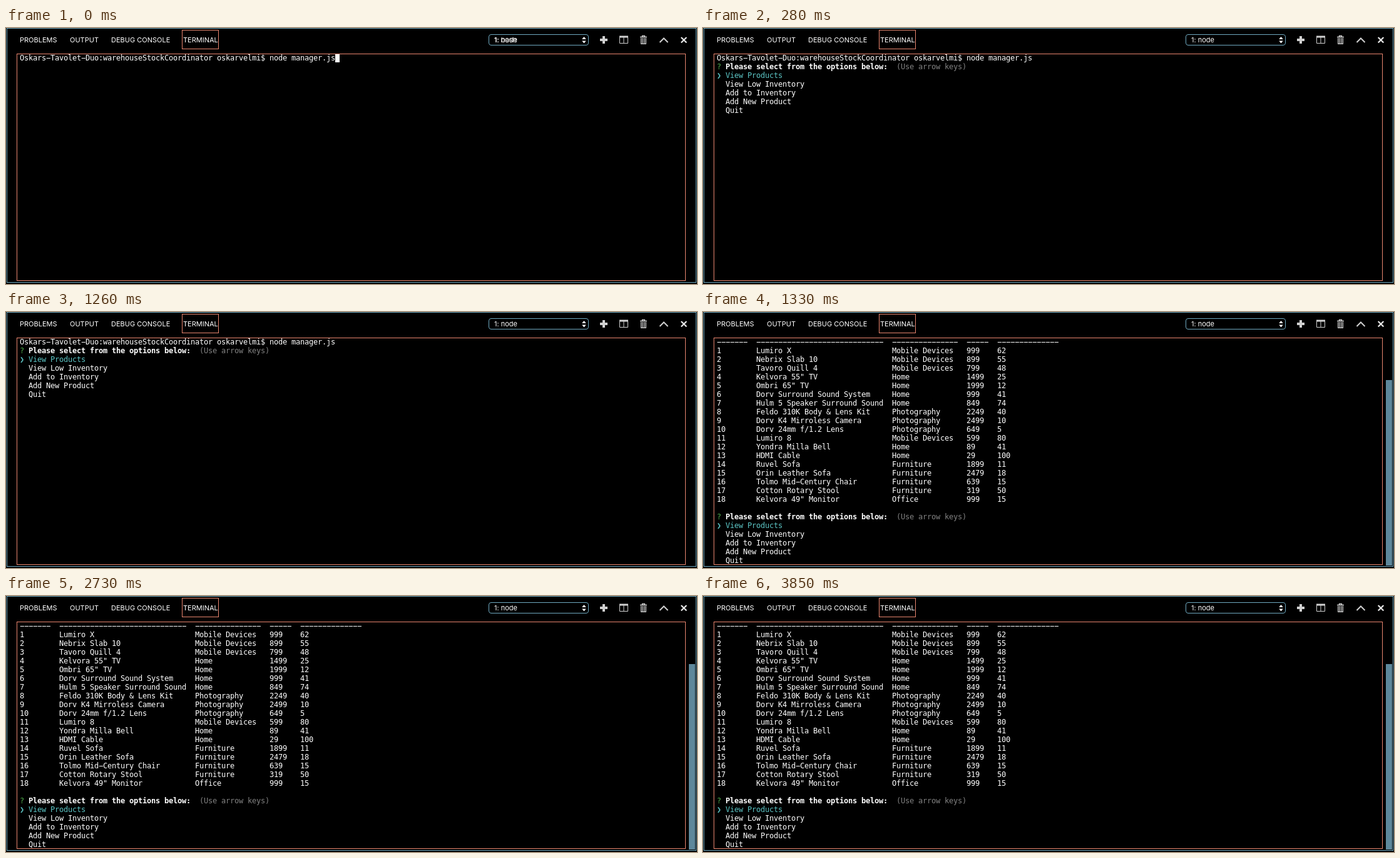
Animation of 1104 by 410 pixels, one loop 3.92 s. Source, as an HTML page:

```html
<!DOCTYPE html>
<html lang="en">
<head>
<meta charset="utf-8">
<title>Terminal</title>
<style>
  :root { --line: #6fa9c0; --focus: #ea866f; --loop: 3920ms step-end infinite; }
  html, body { margin: 0; width: 100%; height: 100%; overflow: hidden; background: #000; }
  .stage { position: relative; width: 1104px; height: 410px; overflow: hidden; background: #000; color: #fff; }
  .stage > *, .arrow { position: absolute; }

  .panel { left: 1px; top: 0; width: 1100px; height: 406px; border: 1px solid var(--line); }
  .focus { border: 1px solid var(--focus); }
  .view { left: 17px; top: 41px; width: 1067px; height: 362px; }
  .tab-box { left: 281px; top: 3px; width: 57px; height: 29px; }

  .ui { top: 8px; font: 11px/22px Inter, "Liberation Sans", sans-serif; white-space: pre; }
  .select { left: 771px; top: 10px; width: 158px; height: 16px; border: 1px solid var(--line); border-radius: 4px; }
  .icons { left: 0; top: 0; }

  pre {
    left: 22px; top: 41px; margin: 0;
    font: 12px/14px "DejaVu Sans Mono", "Liberation Mono", monospace;
    letter-spacing: calc(7px - 1ch);
  }
  pre b { font-weight: 700; }
  .ok { color: #4fae4b; }
  .pick { color: #5cc6c6; }
  .hint { color: #828282; }
  .arrow { left: 0; }
  .caret { width: 7px; height: 14px; background: #fff; }
  .scroll { left: 1091px; top: 109px; width: 10px; height: 297px; background: #5e889b; }

  /* typed command 0, running 70, menu 280, listing 1330 (ms) */
  .typed { animation: typed var(--loop); }
  .running { animation: running var(--loop); }
  .waiting { animation: waiting var(--loop); }
  .command { animation: command var(--loop); }
  .listing { animation: listing var(--loop); }
  .menu { top: 55px; animation: menu var(--loop); }

  @keyframes typed { 0% { visibility: visible } 1.7857%, 100% { visibility: hidden } }
  @keyframes running { 0% { visibility: hidden } 1.7857%, 100% { visibility: visible } }
  @keyframes waiting {
    0% { visibility: hidden }
    1.7857% { visibility: visible }
    7.1428%, 100% { visibility: hidden }
  }
  @keyframes command { 0% { visibility: visible } 33.9285%, 100% { visibility: hidden } }
  @keyframes listing { 0% { visibility: hidden } 33.9285%, 100% { visibility: visible } }
  @keyframes menu {
    0% { visibility: hidden; transform: none }
    7.1428% { visibility: visible; transform: none }
    33.9285%, 100% { visibility: visible; transform: translateY(266px) }
  }
</style>
</head>
<body>
<div class="stage">
  <div class="panel"></div>

  <span class="ui" style="left:22px">PROBLEMS</span>
  <span class="ui" style="left:102px">OUTPUT</span>
  <span class="ui" style="left:168px">DEBUG CONSOLE</span>
  <span class="ui" style="left:283px">TERMINAL</span>
  <div class="focus tab-box"></div>

  <div class="select"></div>
  <span class="ui typed" style="left:780px">1: bash</span>
  <span class="ui running" style="left:780px">1: node</span>

  <svg class="icons" width="1104" height="40" fill="none" stroke="#d0d0d0">
    <path d="M920.2 18L923.5 14L926.8 18ZM920.2 20.5L923.5 24.5L926.8 20.5Z" fill="#fff" stroke="none"/>
    <path d="M949 19H961M955 13V25" stroke-width="4"/>
    <path d="M980.5 14V24.5H993.5V14M987 14V25"/>
    <path d="M980 14H994" stroke-width="3"/>
    <path d="M1013 14.5H1024M1016.5 14V12.5H1020.5V14" stroke-width="1.4"/>
    <path d="M1014.7 16V25.3H1022.3V16M1017.2 16V25M1019.8 16V25" stroke-width="1.3"/>
    <path d="M1044.5 23L1051 16.5L1057.5 23" stroke-width="2"/>
    <path d="M1078.7 15L1087.3 23.5M1087.3 15L1078.7 23.5" stroke="#e4e4e4" stroke-width="2.3"/>
  </svg>

  <div class="caret typed" style="left:526px;top:41px"></div>
  <div class="caret waiting" style="left:22px;top:55px"></div>

  <pre class="command">Oskars−Tavolet−Duo:warehouseStockCoordinator oskarvelmi$ node manager.js</pre>

  <pre class="listing">−−−−−−−  −−−−−−−−−−−−−−−−−−−−−−−−−−−−−  −−−−−−−−−−−−−−−  −−−−−  −−−−−−−−−−−−−−
1        Lumiro X                       Mobile Devices   999    62
2        Nebrix Slab 10                 Mobile Devices   899    55
3        Tavoro Quill 4                 Mobile Devices   799    48
4        Kelvora 55" TV                 Home             1499   25
5        Ombri 65" TV                   Home             1999   12
6        Dorv Surround Sound System     Home             999    41
7        Hulm 5 Speaker Surround Sound  Home             849    74
8        Feldo 310K Body &amp; Lens Kit     Photography      2249   40
9        Dorv K4 Mirroless Camera       Photography      2499   10
10       Dorv 24mm f/1.2 Lens           Photography      649    5
11       Lumiro 8                       Mobile Devices   599    80
12       Yondra Milla Bell              Home             89     41
13       HDMI Cable                     Home             29     100
14       Ruvel Sofa                     Furniture        1899   11
15       Orin Leather Sofa              Furniture        2479   18
16       Tolmo Mid−Century Chair        Furniture        639    15
17       Cotton Rotary Stool            Furniture        319    50
18       Kelvora 49" Monitor            Office           999    15</pre>

  <pre class="menu"><span class="ok">?</span> <b>Please select from the options below:</b>  <span class="hint">(Use arrow keys)</span>
<span class="pick"><span class="arrow">❯</span>  View Products</span>
  View Low Inventory
  Add to Inventory
  Add New Product
  Quit</pre>

  <div class="scroll listing"></div>
  <div class="focus view"></div>
</div>
</body>
</html>
```
